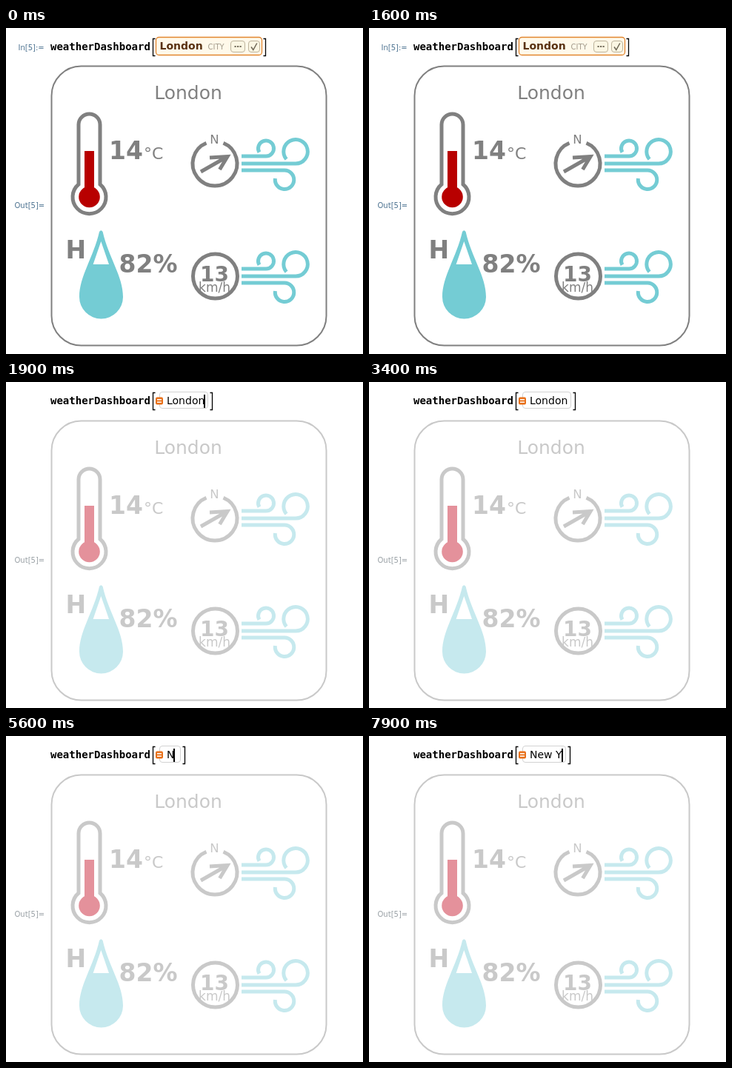
Recreate the animation shown at these times as an HTML page. Size 482 by 440 pixels, loop 8 s.

```html
<!DOCTYPE html>
<html lang="en">
<head>
<meta charset="utf-8">
<title>Weather dashboard</title>
<style>
html, body { margin: 0; width: 100%; height: 100%; overflow: hidden; background: #fff; }
svg { display: block; width: 482px; height: 440px; font-family: "DejaVu Sans", sans-serif; }
#out { --grey: #808080; --red: #b80000; --teal: #74ccd4; --label: #4d7391; }
#out.stale { --grey: #c9c9c9; --red: #e4919b; --teal: #c6e9ee; --label: #99a0a5; transform: translateY(1px); }
#out text { fill: var(--grey); }
#out .label { fill: var(--label); }
.line { fill: none; stroke: var(--grey); stroke-width: 5; }
.wind { fill: none; stroke: var(--teal); stroke-width: 5; }
.big { font-weight: bold; font-size: 33px; }
.mono { font: bold 14px "DejaVu Sans Mono", monospace; }
.label { font-size: 10px; fill: #4d7391; }
.bracket { fill: none; stroke: #000; stroke-width: 1.3; }
.button { fill: #fbf6e3; stroke: #bdb49c; }
</style>
</head>
<body>
<svg viewBox="0 0 482 440">
  <text id="in" class="label" x="16.5" y="30">In[5]:=</text>
  <text class="mono" x="60" y="30">weatherDashboard</text>
  <path class="bracket" d="M201.500 14.500H198.500V37.500H201.500"/>
  <path id="close" class="bracket" d="M-4 14.500H-1V37.500H-4"/>

  <g id="chip">
    <rect x="202.500" y="12.500" width="143" height="24" rx="4" fill="#fff9ea" stroke="#e2862f" stroke-width="1.300"/>
    <text x="207.500" y="29" font-size="14" font-weight="bold" fill="#5a3212">London</text>
    <text x="272.500" y="29" font-size="10" fill="#a39b8c">CITY</text>
    <rect class="button" x="303.500" y="17.500" width="19" height="15" rx="3.500"/>
    <path d="M308.500 25h2.200m1.300 0h2.200m1.300 0h2.200" stroke="#77705f" stroke-width="2"/>
    <rect class="button" x="327.500" y="17.500" width="15" height="15" rx="3.500"/>
    <path d="M331 25.500l2.800 4 5-9" fill="none" stroke="#6f6857" stroke-width="1.500"/>
  </g>

  <g id="picked">
    <rect x="201" y="11" width="75" height="27" fill="#4a93c6"/>
    <rect x="207.500" y="13.500" width="66" height="22" rx="3" fill="#aed0e8" stroke="#8fb9d8"/>
    <rect x="202.500" y="20.500" width="9" height="9" rx="1.500" fill="#a08468"/>
    <path d="M204.500 23.500h5m-5 3h5" stroke="#cfdbe0" stroke-width="1.500"/>
    <text x="217" y="30" font-size="14" fill="#263743">London</text>
  </g>

  <g id="field">
    <rect id="box" x="207.500" y="13.500" height="22" rx="3.500" fill="#fff" stroke="#d2d2d2"/>
    <rect x="202" y="20.500" width="10" height="10" rx="2" fill="#e8701a"/>
    <path d="M204 23.800h6m-6 3.400h6" stroke="#fff" stroke-width="1.600"/>
    <text id="typed" x="217" y="30" font-size="14" xml:space="preserve"></text>
    <rect id="caret" y="17" width="2" height="18"/>
  </g>

  <g id="out">
    <text class="label" x="11.500" y="243">Out[5]=</text>
    <rect class="line" x="61.500" y="51.500" width="371" height="377" rx="40" style="stroke-width:2"/>
    <text x="246" y="96" font-size="25" text-anchor="middle">London</text>

    <path class="line" d="M98 211V130.500a14.500 14.500 0 0 1 29 0V211A22.500 22.500 0 1 1 98 211Z"/>
    <path d="M106 166h13v62h-13z" fill="var(--red)"/>
    <circle cx="112.500" cy="228" r="14.300" fill="var(--red)"/>
    <text class="big" x="139" y="177">14</text>
    <text x="186" y="177" font-size="22">°C</text>

    <path d="M126 275Q128.300 271.500 130.600 275C138.500 310 158 335 158 363A29.500 29.500 0 0 1 99 363C99 335 118 310 126 275Z" fill="var(--teal)"/>
    <path d="M128.300 288L139 319H117.600Z" fill="#fff"/>
    <text class="big" x="80.500" y="311">H</text>
    <text class="big" x="152.500" y="330">82%</text>

    <path class="line" d="M270.500 155.300A30 30 0 1 0 293.500 155.300"/>
    <path class="line" d="M263 194L299 173.500M275 175L299 173.500L288.500 191"/>
    <text x="281.500" y="156" font-size="16.500" text-anchor="middle">N</text>

    <circle class="line" cx="282.500" cy="335" r="30"/>
    <text x="281.500" y="342" font-size="28" font-weight="bold" text-anchor="middle">13</text>
    <text x="281.500" y="356" font-size="17" text-anchor="middle">km/h</text>

    <path id="gust" class="wind" d="M318 173H351A10.500 10.500 0 1 0 341.900 167.700M318 183H391A16.250 16.250 0 1 0 378.600 177.200M318 192H376A12.750 12.750 0 1 1 363.400 203"/>
    <use href="#gust" y="152"/>
  </g>
</svg>
<script>
const LOOP = 8000, PICK = 1800, EDIT = 1900;
// [time, text, caret visible]
const steps = [
  [1900, "London", 1], [2400, "London", 0], [2900, "London", 1], [3400, "London", 0],
  [3600, "Londo", 1], [3800, "Lond", 1], [4100, "Lon", 1], [4300, "Lo", 1],
  [4500, "L", 1], [4800, "L", 0], [5000, "", 1], [5300, "", 0],
  [5600, "N", 1], [5800, "Ne", 1], [6300, "New", 1],
  [6600, "New ", 1], [6800, "New ", 0], [7300, "New ", 1], [7800, "New Y", 1]
];
const $ = id => document.getElementById(id);
const show = (id, on) => $(id).style.display = on ? "" : "none";
const moveClose = x => $("close").setAttribute("transform", `translate(${x})`);
const pen = document.createElement("canvas").getContext("2d");
pen.font = '14px "DejaVu Sans", sans-serif';

function drawField(t) {
  const [, text, caret] = steps.filter(s => s[0] <= t).pop();
  const end = Math.round(217 + pen.measureText(text).width);
  const right = Math.max(end + 5, 236);
  $("typed").textContent = text;
  $("caret").setAttribute("x", Math.max(end - 1, 216));
  show("caret", caret);
  $("box").setAttribute("width", right - 207.5 - .5);
  moveClose(right + 6.5);
}

function draw(t) {
  const editing = t >= EDIT, picked = t >= PICK && !editing;
  show("in", !editing);
  show("chip", t < PICK);
  show("picked", picked);
  show("field", editing);
  $("out").classList.toggle("stale", editing);
  if (editing) drawField(t);
  else moveClose(picked ? 280.5 : 351.5);
}

const start = performance.now();
function tick(now) {
  draw(Math.max(0, now - start) % LOOP);
  requestAnimationFrame(tick);
}
draw(0);
requestAnimationFrame(tick);
</script>
</body>
</html>
```
